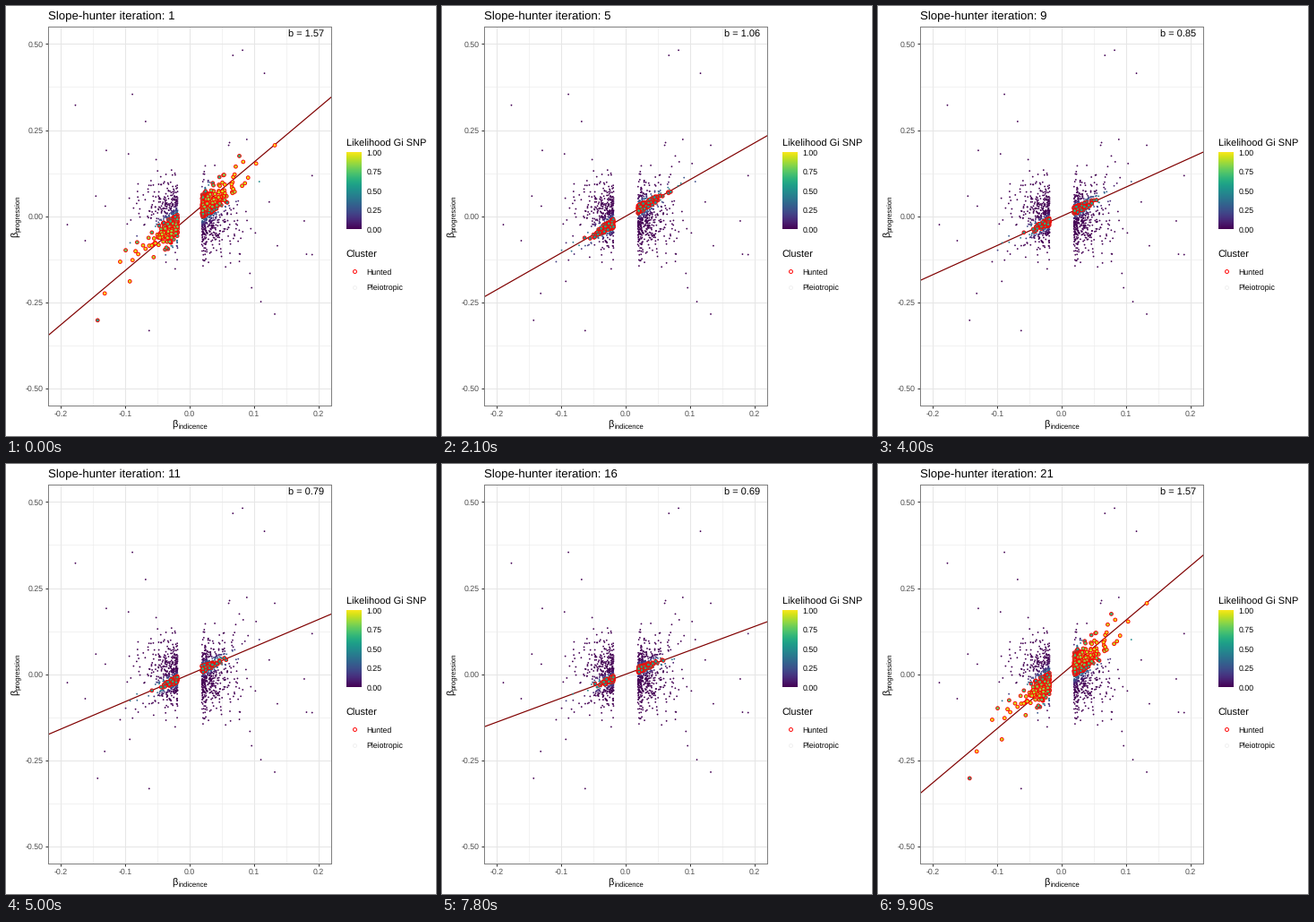
Recreate the animation shown at these times as a matplotlib script. Size 480 px wide and 480 px high, loop 10000 ms.

```python
import numpy as np
import matplotlib.pyplot as plt
from matplotlib.animation import FuncAnimation

SIZE = 480
FRAMES, INTERVAL = 100, 100

plt.rcParams.update({
    "font.family": "Liberation Sans",
    "axes.unicode_minus": False,
    "text.hinting": "none",
})

# The slope settles towards its limit; the moves grow denser near the end.
STEP = np.arange(21)
LAST = len(STEP) - 1
SLOPES = 0.63 + 0.944 * np.exp(-0.2165 * STEP ** 0.92)
STARTS = 4 + 5 * STEP - (STEP >= 10) - np.maximum(0, STEP - 16)
LONG_MOVES = {0, 1, 3, 8, 9, 10, 19}

# The most isolated SNPs
EXTREMES = [
    (0.132, 0.206), (-0.143, -0.302), (-0.132, -0.224), (-0.108, -0.132),
    (-0.093, -0.189), (0.103, 0.153), (0.083, 0.158), (0.077, 0.175),
    (0.067, 0.467), (0.082, 0.482), (0.116, 0.415), (-0.089, 0.354),
    (-0.063, -0.332), (0.132, -0.284),
]


def make_points():
    rng = np.random.default_rng(12)

    n = 1080
    side = np.where(rng.random(n) < 0.47, -1, 1)
    spread = np.where(rng.random(n) < 0.2, 0.028, 0.013)
    x = side * (0.0188 + rng.exponential(spread))
    causal = rng.random(n) < 0.26
    y = np.where(causal, 1.2 * x + rng.normal(0, 0.02, n),
                 -0.3 * x + 0.038 * rng.standard_t(3.2, n))
    keep = (np.abs(x) < 0.1) & (np.abs(y) < 0.14 + 0.6 * np.abs(x))
    cloud = np.column_stack([x, y])[keep]

    m = 40
    x = rng.choice([-1, 1], m) * np.minimum(0.06 + rng.exponential(0.04, m), 0.19)
    halo = np.column_stack([x, -0.3 * x + rng.normal(0, 0.14, m)])
    return np.vstack([cloud, halo, EXTREMES])


def likelihood(points, slope):
    """Chance that each SNP belongs to the hunted cluster."""
    x, y = points.T
    knots = [0.66, 1.06, 1.26, 1.57]
    width = np.interp(slope, knots, [0.011, 0.016, 0.020, 0.030])
    base = np.interp(slope, knots, [0.85, 0.90, 0.95, 0.45])
    gain = np.interp(slope, knots, [-12, -12, 0, 45])
    logit = base + gain * np.abs(x) - ((y - slope * x) / width) ** 2
    return 1 / (1 + np.exp(-np.clip(logit, -50, 50)))


def timeline(frame):
    """Index of the current iteration and progress towards the next."""
    i = int(np.searchsorted(STARTS, frame, side="right")) - 1
    if i < 0:
        return 0, 0.0
    steps = 1 if i == LAST else 3 if i in LONG_MOVES else 2
    t = (frame - STARTS[i] + 1) / steps
    return (i, t) if t <= 1 else (i + 1, 0.0)


def lerp(a, b, t):
    return a + (b - a) * t


points = make_points()
chances = [likelihood(points, slope) for slope in SLOPES]

fig = plt.figure(figsize=(SIZE / 72, SIZE / 72), dpi=72, facecolor="white")


def pixel_axes(left, top, right, bottom):
    return fig.add_axes([left / SIZE, 1 - bottom / SIZE,
                         (right - left) / SIZE, (bottom - top) / SIZE])


def label(x, y, text, size, **style):
    return fig.text(x / SIZE, 1 - y / SIZE, text, fontsize=size,
                    va="baseline", rotation_mode="anchor", **style)


# Main panel
ax = pixel_axes(46.9, 23.2, 363.3, 446.2)
ax.set(xlim=(-0.22, 0.22), ylim=(-0.55, 0.55))
ax.set_xticks(np.arange(-2, 3) / 10)
ax.set_yticks(np.arange(-2, 3) / 4)
ax.set_xticks(np.arange(-3, 4, 2) / 20, minor=True)
ax.set_yticks(np.arange(-3, 4, 2) / 8, minor=True)
ax.xaxis.set_major_formatter("{x:.1f}")
ax.yaxis.set_major_formatter("{x:.2f}")
ax.tick_params(length=2.75, width=1, pad=2.2, color="#333333",
               labelcolor="#4d4d4d", labelsize=8.8)
ax.tick_params(which="minor", length=0)
ax.grid(which="major", color="#e6e6e6", linewidth=1.07)
ax.grid(which="minor", color="#ebebeb", linewidth=0.6)
ax.set_axisbelow(True)
for spine in ax.spines.values():
    spine.set(color="#7f7f7f", linewidth=1)

ends = np.array([-0.22, 0.22])
line, = ax.plot(ends, ends, color="#800000", linewidth=1.2, zorder=2)
dots = ax.scatter(*points.T, zorder=3)

title = label(47, 15.2, "", 13.2)
slope_text = label(355, 35, "", 11, ha="right")

# Axis titles with subscripts
label(185.6, 471, "β", 11)
label(192, 472.4, "indicence", 7.7)
label(13.6, 258, "β", 11, rotation=90)
label(15.4, 251.7, "progression", 7.7, rotation=90)

# Colour bar
label(379.5, 157, "Likelihood Gi SNP", 11)
bar = pixel_axes(380, 163, 397, 249)
bar.imshow(np.linspace(0, 1, 256)[:, None], cmap="viridis", origin="lower",
           aspect="auto")
bar.axis("off")
for value in np.arange(5) / 4:
    label(402.6, 252.5 - 86 * value, f"{value:.2f}", 8.8)

# Cluster key
label(379.5, 281, "Cluster", 11)
key = pixel_axes(380, 287, 397, 323)
key.set(xlim=(380, 397), ylim=(323, 287))
key.axis("off")
for y, name, color in [(296, "Hunted", "red"),
                       (313.5, "Pleiotropic", "#f0f0f0")]:
    key.scatter(388.5, y, s=3.9 ** 2, facecolor="white", edgecolor=color,
                linewidth=0.95)
    label(402.6, y + 4, name, 8.8)


def update(frame):
    i, t = timeline(frame)
    j = (i + 1) % len(SLOPES)
    chance = lerp(chances[i], chances[j], t)
    hunted = lerp(chances[i] > 0.5, (chances[j] > 0.5).astype(float), t)
    order = np.argsort(hunted, kind="stable")
    chance, hunted = chance[order], hunted[order]

    rims = np.zeros((len(points), 4))
    rims[:, 0] = 1
    rims[:, 3] = hunted
    dots.set_offsets(points[order])
    dots.set_sizes(lerp(1.8, 3.8, hunted) ** 2)
    dots.set_facecolors(plt.cm.viridis(chance))
    dots.set_edgecolors(rims)
    dots.set_linewidths(0.9 * hunted)

    line.set_ydata(ends * lerp(SLOPES[i], SLOPES[j], t))
    iteration = min(i + (t > 0.5), LAST) + 1
    title.set_text(f"Slope-hunter iteration: {iteration}")
    slope_text.set_text(f"b = {SLOPES[j if t >= 0.5 else i]:.2f}")
    return dots, line, title, slope_text


animation = FuncAnimation(fig, update, frames=FRAMES, interval=INTERVAL,
                          repeat=True, repeat_delay=0, blit=False)
plt.show()
```
